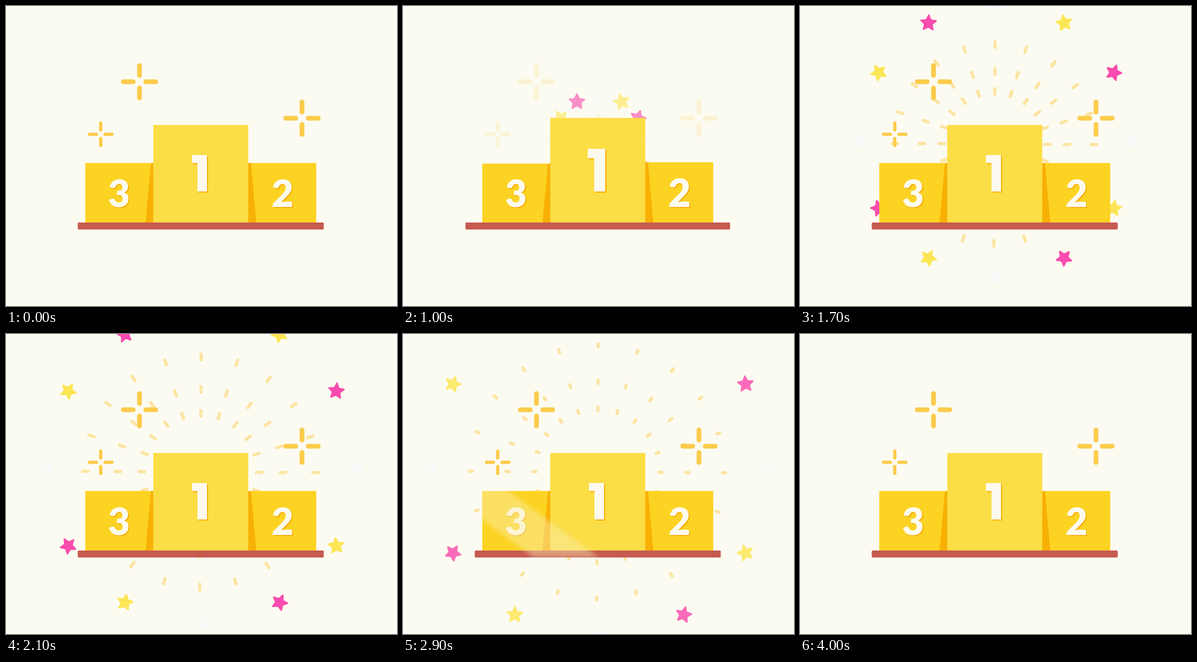
An HTML page for the animation above (4.1 s loop, 782 px wide and 600 px high).

```html
<!DOCTYPE html>
<html lang="en">
<head>
<meta charset="utf-8">
<title>Podium</title>
<style>
html, body { margin: 0; width: 100%; height: 100%; overflow: hidden; background: #fcfbf1; }
svg { display: block; width: 782px; height: 600px; }
text { font: 900 76px Lato, "Open Sans", sans-serif; text-anchor: middle; }
</style>
</head>
<body>
<svg viewBox="0 0 782 600">
  <defs>
    <filter id="soft" x="-20%" y="-20%" width="140%" height="140%"><feGaussianBlur stdDeviation="5"/></filter>
    <clipPath id="podium">
      <path d="M158.5 314H294.5V238H484.5V314H620.5V433H635.5V447H143.5V433H158.5Z"/>
    </clipPath>
    <path id="one" d="M372 298H402V371H383V314H372Z"/>
    <text id="two" x="553" y="402">2</text>
    <text id="three" x="226" y="402">3</text>
    <path id="spark" d="M0-32.5V-12.5M0 12.5V32.5M-32.5 0H-12.5M12.5 0H32.5" stroke="#fbcb4b" stroke-width="9.5" stroke-linecap="round"/>
  </defs>
  <rect width="782" height="600" fill="#fcfbf1"/>
  <path id="rays" fill="none" stroke="#fbcb4b" stroke-width="6.4" stroke-linecap="round"/>
  <g id="stars" stroke-width="3" stroke-linejoin="round"></g>
  <g id="sparks">
    <use href="#spark" transform="translate(267 151.5)"/>
    <use href="#spark" transform="translate(592 224.5)"/>
    <use href="#spark" transform="translate(189.5 256.5) scale(.69)"/>
  </g>
  <g id="left">
    <path d="M158.5 314H295V433H158.5Z" fill="#fcd323"/>
    <path d="M290 314H295V433H279Z" fill="#f8b004"/>
  </g>
  <g id="right">
    <path d="M484 314H620.5V433H484Z" fill="#fcd323"/>
    <path d="M484 314H490L500.5 433H484Z" fill="#f8b004"/>
  </g>
  <rect id="mid" x="294.5" y="238" width="190" height="195" fill="#fbdd45"/>
  <g id="n3"><use href="#three" x="2" y="2" fill="#f8ac06"/><use href="#three" fill="#fcfaef"/></g>
  <g id="n2"><use href="#two" x="2" y="2" fill="#f8ac06"/><use href="#two" fill="#fcfaef"/></g>
  <g id="n1"><use href="#one" x="2" y="2" fill="#f8ac06"/><use href="#one" fill="#fcfaef"/></g>
  <rect id="bar" y="433" height="14" rx="2" fill="#c65a51"/>
  <g clip-path="url(#podium)">
    <path id="shine" d="M-130 0H0L-411-300H-541Z" fill="#fbf0b4" opacity=".45" filter="url(#soft)"/>
  </g>
</svg>
<script>
const LOOP = 4100, STEP = 100, SETTLE = 500;
const $ = id => document.getElementById(id);
const set = (el, attrs) => Object.entries(attrs).forEach(([k, v]) => el.setAttribute(k, v));

const ramp = (t, a, b) => Math.max(0, Math.min(1, (t - a) / (b - a)));
const ease = u => u < .5 ? 4 * u ** 3 : 1 - 4 * (1 - u) ** 3;

// Grows from 0 to peak, then settles at 1.
function swell(t, start, peak, time = 600) {
  const top = start + time;
  return peak * ease(ramp(t, start, top)) - (peak - 1) * ease(ramp(t, top, top + SETTLE));
}

// Flies outwards, slowing down towards max.
const burst = (t, start, max) => max * (1 - Math.exp(-.00175 * Math.max(0, t - start)));

const polar = (cx, cy, r, a) => [cx + r * Math.sin(a), cy - r * Math.cos(a)];
const starPath = "M" + Array.from({ length: 10 }, (_, i) =>
  polar(0, 0, i % 2 ? 7.6 : 15.8, i * Math.PI / 5).map(v => v.toFixed(2))).join("L") + "Z";

const stars = Array.from({ length: 12 }, (_, i) => {
  const el = document.createElementNS("http://www.w3.org/2000/svg", "path");
  const color = ["#f9f9f8", "#fce656", "#f84cae"][i % 3];
  set(el, { d: starPath, fill: color, stroke: color });
  $("stars").append(el);
  return el;
});

function scale(id, x, y, sx, sy) {
  set($(id), { transform: `translate(${x} ${y}) scale(${sx} ${sy}) translate(${-x} ${-y})` });
}

function drawRays(t) {
  const r = burst(t, 882, 261), half = 5.4 * (1 - ramp(t, 2400, 3500));
  const rings = [r, Math.min(r, .64 * r + 18), Math.min(r, .38 * r + 30)];
  let d = "";
  for (let i = 0; i < 20; i++) {
    const a = i * Math.PI / 10 + .006;
    for (const ring of rings)
      d += "M" + polar(389, 276, ring - half, a) + "L" + polar(389, 276, ring + half, a);
  }
  set($("rays"), { d, opacity: .48 * ramp(t, 850, 1150) * (1 - ramp(t, 3250, 3500)) });
}

function drawStars(t) {
  const r = burst(t, 830, 347), turn = 64.5 - .383 * r;
  stars.forEach((el, i) => {
    const at = polar(392.5, 269, r, i * Math.PI / 6);
    set(el, { transform: `translate(${at}) rotate(${i * 30 + turn})` });
  });
  set($("stars"), { opacity: ramp(t, 820, 1110) * (1 - ramp(t, 2800, 3370)) });
}

function drawPodium(t) {
  const width = 492 * swell(t, 100, 1.102, 700);
  set($("bar"), { x: 389.5 - width / 2, width });
  const block = (id, x, start) => scale(id, x, 433, 1, swell(t, start, 1.075));
  block("mid", 389.5, 295);
  block("right", 553, 546);
  block("left", 226, 562);
  const digit = (id, x, y, start) => {
    const s = swell(t, start, 1.168);
    scale(id, x, y, s, s);
  };
  digit("n1", 387, 371, 400);
  digit("n2", 553, 402, 586);
  digit("n3", 226, 402, 604);
}

function draw(t) {
  if (t < STEP) t = LOOP - STEP;
  drawPodium(t);
  drawRays(t);
  drawStars(t);
  set($("sparks"), { opacity: ramp(t, 900, 1500) });
  set($("shine"), {
    transform: `translate(${170 + (t - 2500) * .556} 447)`,
    visibility: t > 2200 && t < 4000 ? "visible" : "hidden"
  });
}

const start = performance.now();
function tick() {
  const t = (performance.now() - start) % LOOP;
  draw(Math.floor(t / STEP) * STEP);
  requestAnimationFrame(tick);
}
tick();
</script>
</body>
</html>
```
